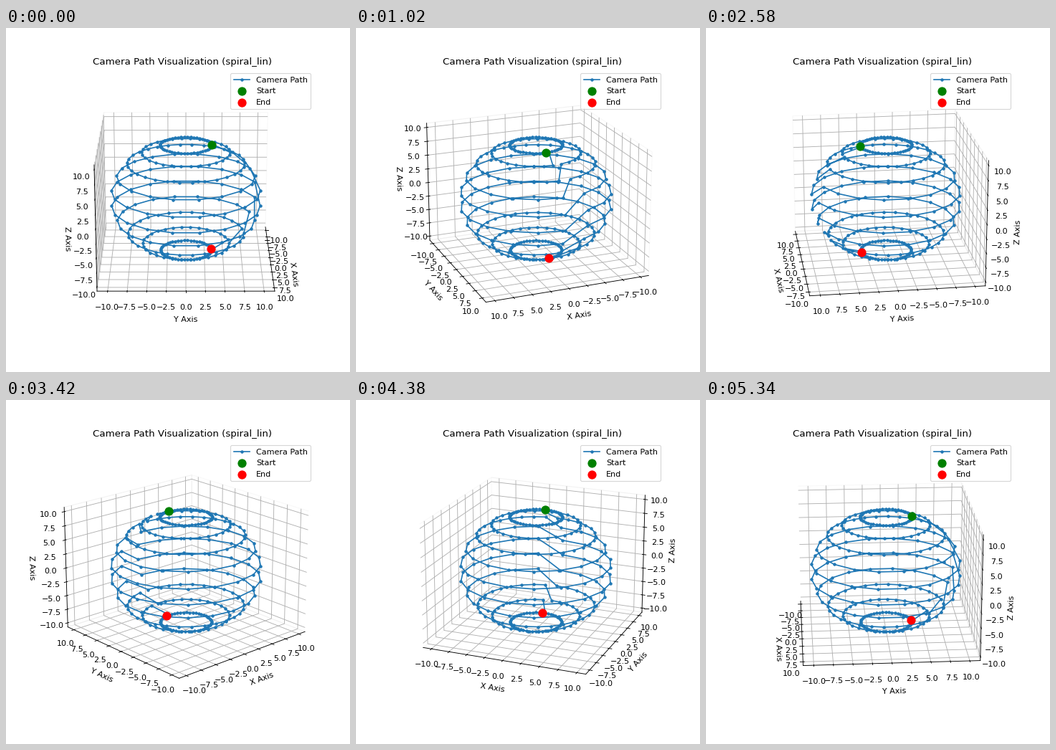
Animation, 480 px wide and 480 px high, one loop 5400 ms. Source, as a matplotlib script:

```python
import numpy as np
import matplotlib.pyplot as plt
from matplotlib.animation import FuncAnimation

FRAMES = 90
INTERVAL = 60
RADIUS = 10
ELEVATION = 20
# Points per ring: sparse near the equator, dense near the poles
RING_SIZES = [50, 30, 30, 18, 18, 18, 18, 30, 30, 50]


def ring(latitude, count):
    """Points of one horizontal ring, starting on the +Y side."""
    t = np.linspace(0, 2 * np.pi, count, endpoint=False)
    r = RADIUS * np.cos(latitude)
    z = np.full(count, RADIUS * np.sin(latitude))
    return np.column_stack([r * np.sin(t), r * np.cos(t), z])


def camera_path():
    latitudes = np.radians(np.linspace(70, -70, len(RING_SIZES)))
    return np.vstack([ring(lat, n) for lat, n in zip(latitudes, RING_SIZES)])


path = camera_path()

fig = plt.figure(figsize=(6, 6), dpi=80)
ax = fig.add_subplot(projection="3d")

ax.plot(*path.T, marker=".", label="Camera Path")
ax.scatter(*path[0], color="green", s=100, label="Start")
ax.scatter(*path[-1], color="red", s=100, label="End")

ax.set_title("Camera Path Visualization (spiral_lin)")
ax.set_xlabel("X Axis")
ax.set_ylabel("Y Axis")
ax.set_zlabel("Z Axis")
ax.legend()

for axis in (ax.xaxis, ax.yaxis, ax.zaxis):
    axis.pane.fill = False


def update(i):
    azim = 360 * i / FRAMES
    # A tiny nudge keeps the choice of back walls stable in side-on views
    nudge = 1e-4 * np.cos(np.radians(azim))
    ax.view_init(elev=ELEVATION, azim=azim + nudge)
    return []


anim = FuncAnimation(fig, update, frames=FRAMES, interval=INTERVAL,
                     init_func=lambda: update(0), repeat=True)

plt.show()
```
